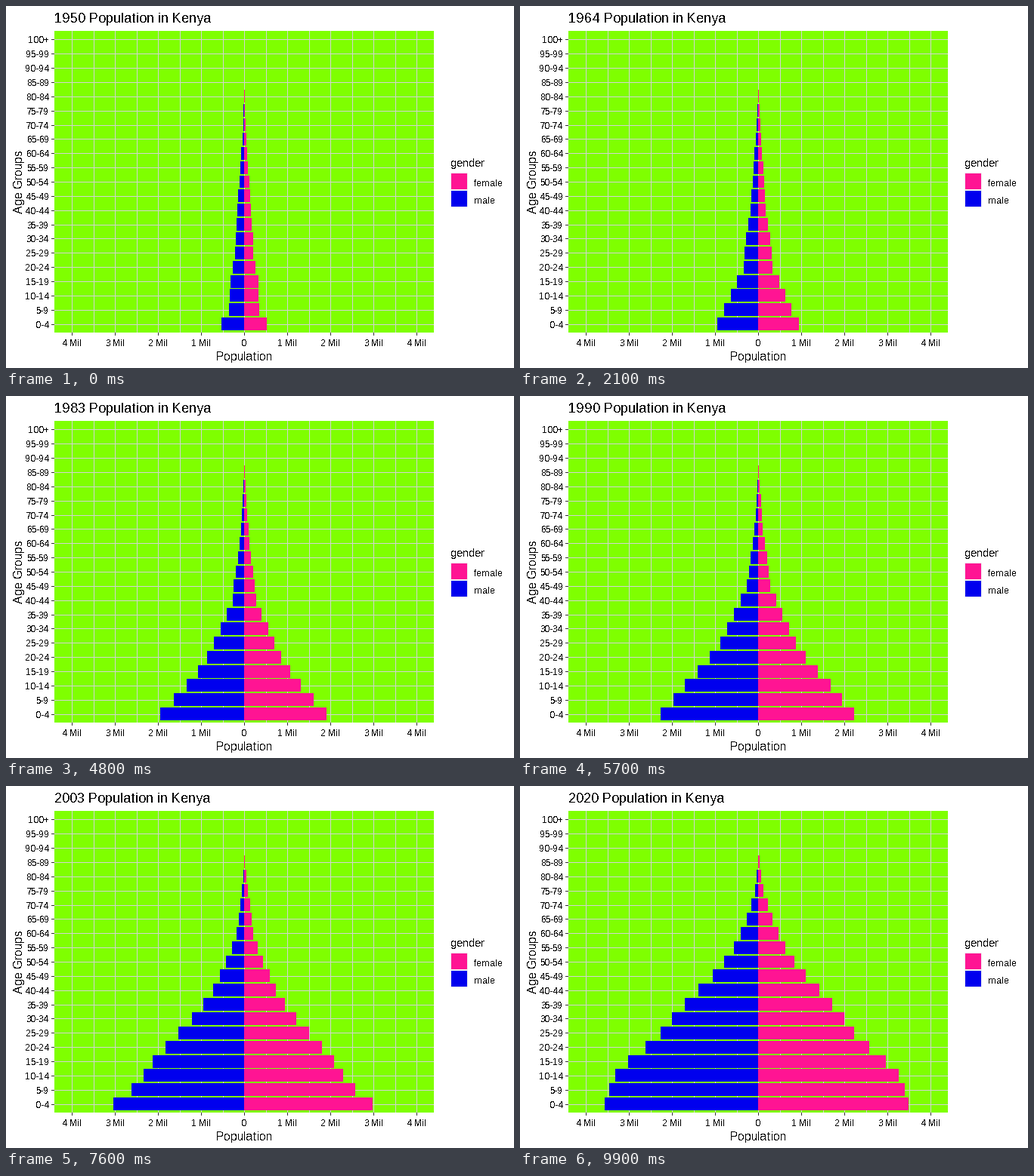
These frames come from a looping animation (672x480 px, 10 s). A matplotlib script:

```python
import numpy as np
import matplotlib.pyplot as plt
from matplotlib.animation import FuncAnimation
from matplotlib.patches import Rectangle

plt.rcParams.update({
    "font.family": "Liberation Sans",
    "text.hinting": "force_autohint",
    "text.hinting_factor": 1,
    "text.antialiased": False,
    "toolbar": "None",
})

W, H, DPI = 672, 480, 96
FRAMES, INTERVAL = 100, 100
START, END = 1950, 2020
LEFT, RIGHT, TOP, BOTTOM = 64, 566, 33, 433
MID = 315.3
MIL = (RIGHT - LEFT) / 8.8          # pixels per million
ROW = (BOTTOM - TOP) / 21.2         # pixels per age group
GROUPS = [f"{a}-{a + 4}" for a in range(0, 100, 5)] + ["100+"]
AGES = np.arange(0, 90, 5)
PINK, BLUE, LIME = "#ff1493", "#0000ee", "#7fff00"
GRID, TICK = "#d3d3d3", "#333333"

# Size of the girls' cohort (in pixels) by year of birth
BIRTH_YEARS = [1925, 1935, 1945, 1950, 1958, 1966, 1973.3,
               1981, 1989, 1996.5, 2004.5, 2012, 2020]
BIRTHS = [14.5, 19.8, 20.7, 30, 42.5, 55.5, 75,
          100.5, 123.5, 139.5, 173, 195.5, 199]


def pyramid(year):
    """Bar lengths of both sexes: cohort size times survival to each age."""
    past = ((END - year) / (END - START)) ** 2
    survival = (1 - (AGES / 88.5) ** 2.3) * np.where(AGES > 0, 0.985, 1)
    female = (np.interp(year - AGES, BIRTH_YEARS, BIRTHS)
              * survival ** (1 + 1.5 * past))
    male = female * (1.02 - 0.5 * (AGES / 80) ** 4 * (1 - past))
    return male, female


def px(v):
    return int(np.floor(v + 0.5))


fig = plt.figure(figsize=(W / DPI, H / DPI), dpi=DPI, facecolor="white")
ax = fig.add_axes([0, 0, 1, 1])
ax.set(xlim=(0, W), ylim=(H, 0))
ax.axis("off")


def box(x0, y0, x1, y1, color):
    return ax.add_patch(Rectangle((x0, y0), x1 - x0, y1 - y0, fc=color, lw=0,
                                  antialiased=False))


def text(x, y, s, size, ha="left", **kw):
    return ax.text(x, y, s, size=size * 72 / DPI, ha=ha, color="black",
                   **{"va": "baseline", **kw})


box(LEFT, TOP, RIGHT, BOTTOM, LIME)

for half in range(-8, 9):
    x = px(MID + half * MIL / 2)
    box(x, TOP, x + 1, BOTTOM, GRID)
    if half % 2 == 0:
        n = abs(half) // 2
        box(x, BOTTOM, x + 1, BOTTOM + 4, TICK)
        text(x, 451, f"{n} Mil" if n else "0", 12, "center")

centers = BOTTOM - ROW * (0.6 + np.arange(len(GROUPS)))
for c, name in zip(centers, GROUPS):
    y = px(c)
    box(LEFT, y, RIGHT, y + 1, GRID)
    box(LEFT - 4, y, LEFT, y + 1, TICK)
    text(57, y + 5, name, 12, "right")

title = text(64, 22, "", 18)
text(MID, 470, "Population", 16, "center")
text(17.5, 233, "Age Groups", 16, "center", va="center", rotation=90)

text(588, 213, "gender", 15)
box(588, 221, 611, 267, "#f2f2f2")
for y, name, color in [(222, "female", PINK), (245, "male", BLUE)]:
    box(589, y, 610, y + 21, color)
    text(619, y + 17, name, 12)


def bars(color):
    return [box(px(MID), px(c - 0.45 * ROW), px(MID), px(c + 0.45 * ROW), color)
            for c in centers[:len(AGES)]]


male_bars, female_bars = bars(BLUE), bars(PINK)


def draw(i):
    span, last = END - START, FRAMES - 1
    title.set_text(f"{START + span * i // last} Population in Kenya")
    male, female = pyramid(START + span * i / last)
    for bar, w in zip(male_bars + female_bars, [*-male, *female]):
        bar.set_width(px(MID + w) - px(MID))
    return [title, *male_bars, *female_bars]


anim = FuncAnimation(fig, draw, frames=FRAMES, interval=INTERVAL, repeat=True)
plt.show()
```
